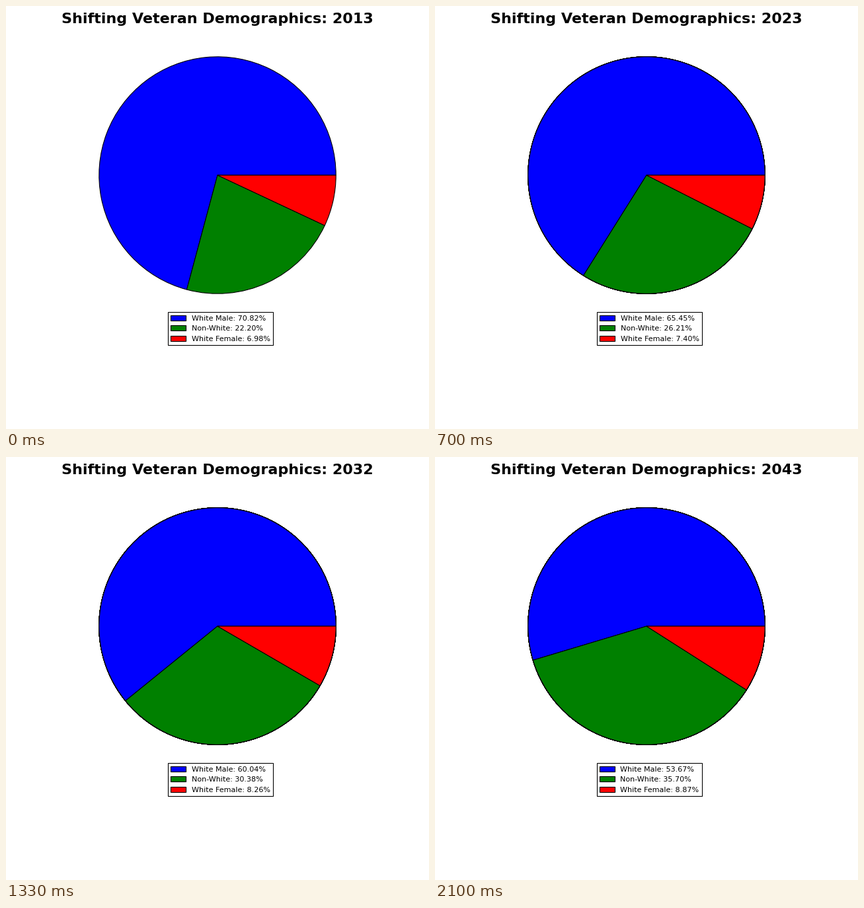
Write a matplotlib script that moves like this. It is 640x640 px and loops after 2170 ms.

```python
import matplotlib.pyplot as plt
import numpy as np
from matplotlib.animation import FuncAnimation

plt.style.use("classic")
plt.rcParams["savefig.dpi"] = "figure"

YEARS = np.arange(2013, 2044)
KNOTS = np.array([2013, 2019, 2023, 2027, 2032, 2036, 2043])
MALE = [70.82, 67.71, 65.45, 63.09, 60.04, 57.58, 53.67]
NON_WHITE = [22.20, 24.52, 26.21, 28.00, 30.38, 32.36, 35.70]
FEMALE = [6.30, 6.97, 7.40, 7.81, 8.26, 8.56, 8.87]
NAMES = ["White Male", "Non-White", "White Female"]
COLORS = ["blue", "green", "red"]


def smooth(values):
    """Cubic Hermite curve through the knots, sampled once per year."""
    v = np.array(values)
    slope = np.gradient(v, KNOTS, edge_order=2)
    k = np.clip(np.searchsorted(KNOTS, YEARS, side="right") - 1, 0, len(KNOTS) - 2)
    h = KNOTS[k + 1] - KNOTS[k]
    t = (YEARS - KNOTS[k]) / h
    return ((1 + 2 * t) * (1 - t) ** 2 * v[k] + t * (1 - t) ** 2 * h * slope[k]
            + t**2 * (3 - 2 * t) * v[k + 1] + t**2 * (t - 1) * h * slope[k + 1])


shares = np.column_stack([smooth(v) for v in (MALE, NON_WHITE, FEMALE)])
# The opening year shows the last group as the remainder.
shares[0, 2] = 100 - shares[0, :2].sum()

fig = plt.figure(figsize=(8, 8), dpi=80, facecolor="white")
ax = fig.add_axes([0.15, 0.25, 0.7, 0.7])
pies = [ax.pie(row, colors=COLORS)[0] for row in shares]
title = ax.set_title("", fontsize=20, fontweight="bold", pad=5)


def update(i):
    # Earlier pies stay underneath, so the rim darkens after the first year.
    for n, wedges in enumerate(pies):
        for wedge in wedges:
            wedge.set_visible(n <= i)
    title.set_text(f"Shifting Veteran Demographics: {YEARS[i]}")
    labels = [f"{name}: {share:.2f}%" for name, share in zip(NAMES, shares[i])]
    ax.legend(pies[i], labels, fontsize=10, loc="upper right",
              bbox_to_anchor=(0.7, 0.05))


anim = FuncAnimation(fig, update, frames=len(YEARS), interval=70,
                     repeat=True, repeat_delay=0)
plt.show()
```
